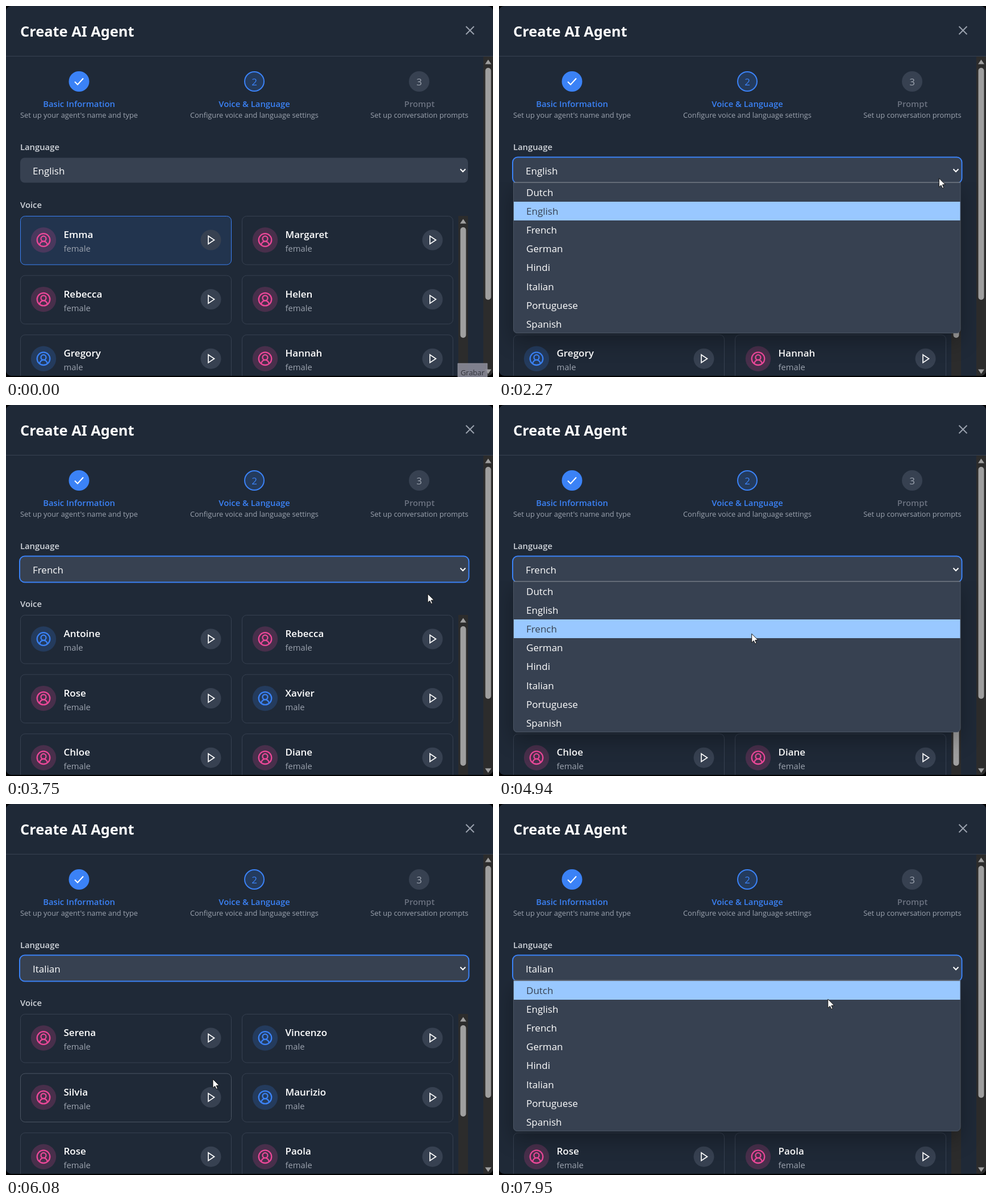
These frames come from a looping animation (857 by 654 pixels, 8000 ms). An HTML page with a canvas:

```html
<!DOCTYPE html>
<html lang="en">
<head>
<meta charset="utf-8">
<title>Create AI Agent</title>
<style>
html, body { margin: 0; width: 100%; height: 100%; overflow: hidden; background: #000; }
canvas { display: block; }
</style>
</head>
<body>
<canvas id="stage" width="857" height="654"></canvas>
<script>
const ctx = document.getElementById('stage').getContext('2d');
const LOOP = 8000;
const C = {
  bg: '#1f2937', panel: '#374151', blue: '#3b82f6', pink: '#ec4899',
  soft: '#d1d5db', gray: '#9ca3af', dim: '#6b7280', hover: '#4b5563',
  pick: '#99c8ff', track: '#2c2c2c', thumb: '#9f9f9f'
};
const LANGS = ['Dutch', 'English', 'French', 'German', 'Hindi', 'Italian', 'Portuguese', 'Spanish'];
const ROW = 33.1, LIST_Y = 311.5;

// Voice lists: names, genders and the end of the scroll thumb
const VOICES = {
  English: { names: ['Emma', 'Margaret', 'Rebecca', 'Helen', 'Gregory', 'Hannah'], sex: 'ffffmf', end: 585 },
  French: { names: ['Antoine', 'Rebecca', 'Rose', 'Xavier', 'Chloe', 'Diane'], sex: 'mffmff', end: 636 },
  Italian: { names: ['Serena', 'Vincenzo', 'Silvia', 'Maurizio', 'Rose', 'Paola'], sex: 'fmfmff', end: 551 }
};

// Pointer path: time, x, y
const PATH = [
  [270, 818, 652], [520, 775, 590], [800, 752, 430], [1070, 794, 298], [1200, 794, 293],
  [2240, 794, 293], [2530, 610, 393], [3200, 610, 393], [3480, 602, 383], [3550, 606, 382],
  [3750, 742, 333], [4150, 795, 286], [4600, 795, 286], [4940, 445, 403], [5140, 385, 462],
  [5540, 364, 485], [6150, 364, 485], [6550, 600, 392], [6880, 805, 290], [7600, 805, 290],
  [7950, 579, 344], [8000, 570, 346]
];
const CLICKS = [[1200, 1410], [2740, 2880], [4480, 4620], [5540, 5680], [7480, 7620]];
const OPEN = [[1340, 2880], [4550, 5680], [7550, 8000]];
const VOICE_DELAY = 210;

const during = (spans, t) => spans.some(([a, b]) => t >= a && t < b);
const language = t => t < 2880 ? 'English' : t < 5680 ? 'French' : 'Italian';

function pointer(t) {
  if (t < PATH[0][0]) return null;
  const i = PATH.findIndex(p => p[0] > t);
  const [t0, x0, y0] = PATH[i - 1], [t1, x1, y1] = PATH[i];
  const k = (t - t0) / (t1 - t0);
  return { x: x0 + (x1 - x0) * k, y: y0 + (y1 - y0) * k };
}

function text(str, x, y, size, color, weight = 400, align = 'left', family = '"Open Sans"') {
  ctx.font = `${weight} ${size}px ${family}, "Noto Sans", sans-serif`;
  ctx.textAlign = align;
  ctx.fillStyle = color;
  ctx.fillText(str, x, y);
}

function paint(fill, stroke, width = 1) {
  if (fill) { ctx.fillStyle = fill; ctx.fill(); }
  if (stroke) { ctx.strokeStyle = stroke; ctx.lineWidth = width; ctx.stroke(); }
}

function box(x, y, w, h, r, fill, stroke, width) {
  ctx.beginPath();
  ctx.roundRect(x, y, w, h, r);
  paint(fill, stroke, width);
}

function disc(x, y, r, fill, stroke, width) {
  ctx.beginPath();
  ctx.arc(x, y, r, 0, Math.PI * 2);
  paint(fill, stroke, width);
}

function line(points, fill, stroke, width, close) {
  ctx.beginPath();
  points.forEach(([x, y]) => ctx.lineTo(x, y));
  if (close) ctx.closePath();
  paint(fill, stroke, width);
}

function arrow(x, y, dir) {
  line([[x - 5.5, y + 4 * dir], [x, y - 4 * dir], [x + 5.5, y + 4 * dir]], C.thumb, null, 0, true);
}

function header() {
  text('Create AI Agent', 25, 53.5, 25.4, '#fff', 700, 'left', '"Noto Sans"');
  line([[809.5, 36], [823.5, 50]], null, C.gray, 2);
  line([[823.5, 36], [809.5, 50]], null, C.gray, 2);
  ctx.fillStyle = C.panel;
  ctx.fillRect(0, 88, 857, 1);
}

function step(x, label, note, color) {
  text(label, x, 178, 14.8, color, 600, 'center');
  text(note, x, 196.5, 12.8, C.gray, 400, 'center');
}

function steps() {
  disc(128.5, 133, 18, C.blue);
  line([[121, 133.5], [126, 138.5], [136, 127.5]], null, '#fff', 2);
  step(128.5, 'Basic Information', "Set up your agent's name and type", C.blue);
  disc(437, 133, 17, 'rgba(59,130,246,.2)', C.blue, 2);
  text('2', 437, 140, 17, C.blue, 400, 'center');
  step(437, 'Voice & Language', 'Configure voice and language settings', C.blue);
  disc(727, 133, 18, C.panel);
  text('3', 727, 140, 17, C.gray, 400, 'center');
  step(727.5, 'Prompt', 'Set up conversation prompts', C.dim);
}

function select(value, focused) {
  text('Language', 25, 254, 14.8, C.soft, 600);
  box(25, 267.5, 788, 44, 8, C.panel);
  if (focused) box(24, 266.5, 790.5, 46, 9, C.panel, C.blue, 2);
  text(value, 47, 297, 17, '#fff');
  line([[799.5, 287.5], [804, 292], [808.5, 287.5]], null, '#fff', 2);
}

function avatar(x, y, male) {
  const color = male ? C.blue : C.pink;
  disc(x, y, 22.2, male ? 'rgba(59,130,246,.2)' : 'rgba(236,72,153,.2)');
  ctx.save();
  ctx.translate(x, y);
  ctx.scale(1.13, 1.13);
  disc(0, 0, 10, null, color, 2);
  disc(0, -2, 4, null, color, 2);
  ctx.beginPath();
  ctx.arc(0, 8, 6, Math.PI, 0);
  paint(null, color, 2);
  ctx.restore();
}

function card(i, name, male, selected, mouse) {
  const x = 25.5 + (i % 2) * 390, y = 370.5 + (i >> 1) * 104.6;
  const over = mouse && mouse.x > x && mouse.x < x + 371 && mouse.y > y && mouse.y < y + 86;
  box(x, y, 371, 85.5, 8, selected && 'rgba(59,130,246,.12)',
    selected ? C.blue : over ? C.hover : C.panel);
  const mid = y + 42;
  avatar(x + 40.5, mid, male);
  text(name, x + 76, y + 38.5, 17, '#fff', 600);
  text(male ? 'male' : 'female', x + 76, y + 62.5, 14.8, C.gray);
  disc(x + 335, mid, 18, C.panel);
  const px = x + 330.5;
  line([[px, mid - 7], [px + 10.5, mid], [px, mid + 7]], null, '#fff', 1.7, true);
}

function voices(lang, mouse) {
  const { names, sex, end } = VOICES[lang];
  text('Voice', 25, 356, 14.8, C.soft, 600);
  names.forEach((name, i) => card(i, name, sex[i] === 'm', lang === 'English' && i === 0, mouse));
  ctx.fillStyle = C.track;
  ctx.fillRect(796, 370, 17, 284);
  arrow(804.5, 379.5, 1);
  box(799.5, 390, 10, end - 390, 5, C.thumb);
}

function pageScroll() {
  ctx.fillStyle = C.track;
  ctx.fillRect(840, 89, 17, 565);
  arrow(848.5, 98.5, 1);
  arrow(848.5, 644.5, -1);
  box(843.5, 109, 10, 409, 5, C.thumb);
}

function dropdown(value, mouse) {
  const hovered = Math.floor((mouse.y - LIST_Y) / ROW);
  const active = hovered >= 0 ? hovered : LANGS.indexOf(value);
  ctx.save();
  ctx.beginPath();
  ctx.rect(0, 311, 857, 343);
  ctx.clip();
  ctx.shadowColor = 'rgba(0,0,0,.3)';
  ctx.shadowBlur = 36;
  ctx.shadowOffsetY = 14;
  box(25, 311, 787, 266, [0, 0, 7, 7], C.panel);
  ctx.restore();
  box(25.5, 311, 786.5, 265.5, [0, 0, 7, 7], null, C.hover);
  ctx.fillStyle = '#858b95';
  ctx.fillRect(26, 310.5, 786, 1);
  ctx.fillStyle = C.pick;
  ctx.fillRect(26, Math.round(LIST_Y + active * ROW), 785.5, 33);
  LANGS.forEach((name, i) => text(name, 48, 335 + i * ROW, 17, i === active ? C.panel : '#fff'));
}

function cursor({ x, y }, pressed) {
  if (pressed) disc(x, y, 13.5, 'rgba(200,200,0,.7)');
  const shape = [[0, 0], [0, 15.5], [3.6, 12.2], [6, 17.6], [8.4, 16.5], [6, 11.3], [11, 11]];
  line(shape.map(([dx, dy]) => [x + dx, y + dy]), pressed ? '#fdfb8a' : '#fff', '#111', 1, true);
}

function hint() {
  box(795, 630, 52, 26, 0, 'rgba(140,141,154,.88)', 'rgba(160,160,170,.6)');
  text('Grabar', 821, 650.5, 13, '#30323a', 400, 'center');
}

function draw(t) {
  const mouse = pointer(t), open = during(OPEN, t), value = language(t);
  ctx.fillStyle = '#000';
  ctx.fillRect(0, 0, 857, 654);
  ctx.save();
  ctx.beginPath();
  ctx.roundRect(0, 0, 857, 652, 9);
  ctx.clip();
  ctx.fillStyle = C.bg;
  ctx.fillRect(0, 0, 857, 654);
  header();
  steps();
  select(value, t >= 1270);
  voices(language(t - VOICE_DELAY), open ? null : mouse);
  pageScroll();
  if (open) dropdown(value, mouse);
  ctx.restore();
  if (t < 70) hint();
  if (mouse) cursor(mouse, during(CLICKS, t));
}

const start = performance.now();
function tick() {
  draw((performance.now() - start) % LOOP);
  requestAnimationFrame(tick);
}
tick();
</script>
</body>
</html>
```
